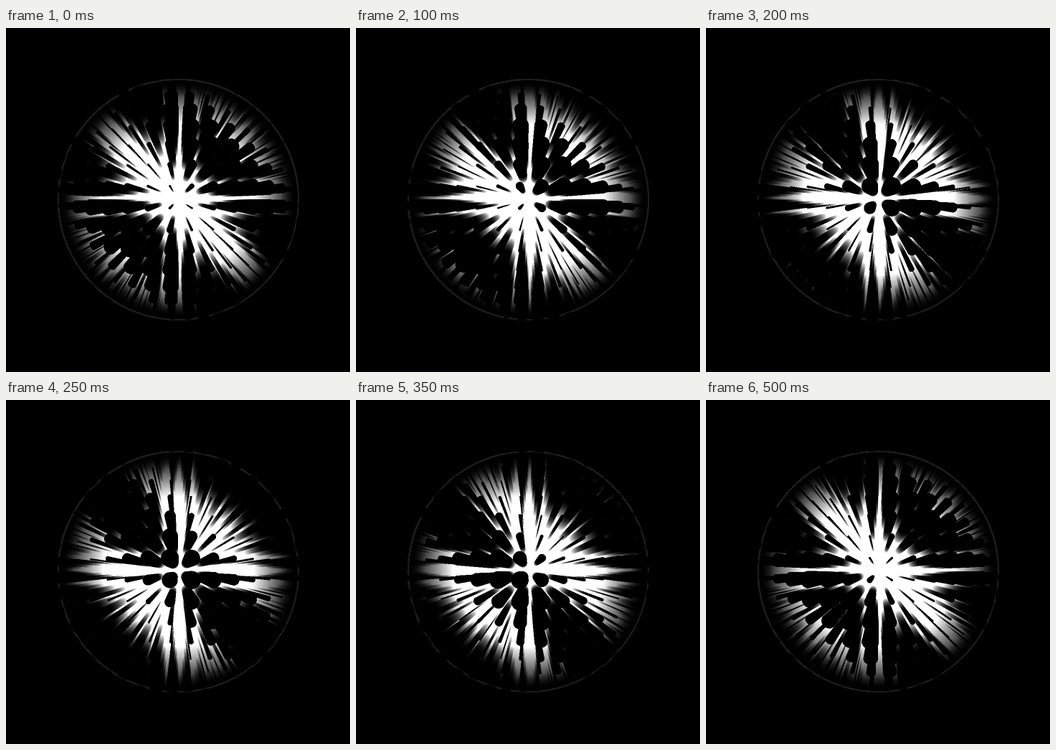
An HTML page with a canvas that plays this animation: 480 by 480 pixels, repeating every 0.55 s.

```html
<!DOCTYPE html>
<html lang="en">
<head>
<meta charset="utf-8">
<title>Pin sphere</title>
<style>
  html, body { margin: 0; width: 100%; height: 100%; overflow: hidden; background: #000; }
  canvas { display: block; width: 480px; height: 480px; }
</style>
</head>
<body>
<canvas id="stage" width="480" height="480"></canvas>
<script>
// A sphere filled with parallel rods whose thickness follows a travelling
// wave. Light grows with the depth a view ray reaches before hitting a rod.
const SIZE = 480, LOOP = 550, STEP = 50;
const CX = 240, CY = 239, EDGE = 169, FADE = 64;
const RADIUS = 9, CAM = 19.5, FOCAL = 31 * (CAM - RADIUS);
const SHIFT_X = 0.13, SHIFT_Y = -0.1;
const DARK = 3, LIT = 8, RIM = 0.11, SUB = 2;
const CELLS = 26, HALF = CELLS / 2;

const ctx = document.getElementById('stage').getContext('2d');
const frames = [];

function rodRadii(time) {
  const radii = new Float64Array(CELLS * CELLS);
  for (let j = 0; j < CELLS; j++) {
    for (let i = 0; i < CELLS; i++) {
      const phase = (time - 255) / LOOP + 0.112 * (i - j);
      radii[j * CELLS + i] = 0.225 + 0.185 * Math.cos(2 * Math.PI * phase);
    }
  }
  return radii;
}

// Depth travelled inside the sphere along the ray (a, b, 1).
function rayDepth(a, b, radii) {
  const slope = a * a + b * b, k = 1 + slope;
  const disc = CAM * CAM - k * (CAM * CAM - RADIUS * RADIUS);
  if (disc <= 0) return 0;
  const root = Math.sqrt(disc);
  const near = (CAM - root) / k, far = (CAM + root) / k;
  const px = a * near - SHIFT_X, py = b * near - SHIFT_Y;
  let i = Math.floor(px), j = Math.floor(py);
  const si = a < 0 ? -1 : 1, sj = b < 0 ? -1 : 1;
  const da = Math.abs(1 / a), db = Math.abs(1 / b);
  let nextX = near + (a < 0 ? px - i : i + 1 - px) * da;
  let nextY = near + (b < 0 ? py - j : j + 1 - py) * db;
  let z = near;
  while (z < far) {
    if (i < -HALF || i >= HALF || j < -HALF || j >= HALF) break;
    const r = radii[(j + HALF) * CELLS + i + HALF];
    const x = i + 0.5 + SHIFT_X, y = j + 0.5 + SHIFT_Y;
    const ex = a * near - x, ey = b * near - y;
    if (ex * ex + ey * ey < r * r) return 0;
    const dot = a * x + b * y;
    const q = dot * dot - slope * (x * x + y * y - r * r);
    if (q > 0) {
      const hit = (dot - Math.sqrt(q)) / slope;
      if (hit >= near && hit < far) return hit - near;
    }
    if (nextX < nextY) { z = nextX; nextX += da; i += si; }
    else { z = nextY; nextY += db; j += sj; }
  }
  return far - near;
}

const clamp = v => Math.min(1, Math.max(0, v));

function light(depth, dist) {
  if (dist > EDGE - 2.5) return depth > 0 ? RIM : 0;
  const fade = Math.pow(clamp((EDGE - dist) / FADE), 1.3);
  return fade * Math.pow(clamp((depth - DARK) / (LIT - DARK)), 1.5);
}

function render(time) {
  const radii = rodRadii(time);
  const image = ctx.createImageData(SIZE, SIZE);
  new Uint32Array(image.data.buffer).fill(0xff000000);
  for (let y = CY - EDGE; y <= CY + EDGE; y++) {
    for (let x = CX - EDGE; x <= CX + EDGE; x++) {
      const dist = Math.hypot(x - CX, y - CY);
      if (dist > EDGE) continue;
      let sum = 0;
      for (let n = 0; n < SUB * SUB; n++) {
        const a = (x - CX + (n % SUB + 0.5) / SUB) / FOCAL + 1e-7;
        const b = (y - CY + (Math.floor(n / SUB) + 0.5) / SUB) / FOCAL + 1e-7;
        sum += light(rayDepth(a, b, radii), dist);
      }
      const p = (y * SIZE + x) * 4;
      image.data.fill(Math.round(255 * sum / (SUB * SUB)), p, p + 3);
    }
  }
  return image;
}

for (let n = 0; n < LOOP / STEP; n++) frames.push(render(n * STEP));

let shown = -1;
function draw(time) {
  const n = Math.floor((time % LOOP) / STEP);
  if (n === shown) return;
  ctx.putImageData(frames[n], 0, 0);
  shown = n;
}

const start = performance.now();
function tick() {
  draw(performance.now() - start);
  requestAnimationFrame(tick);
}
tick();
</script>
</body>
</html>
```
